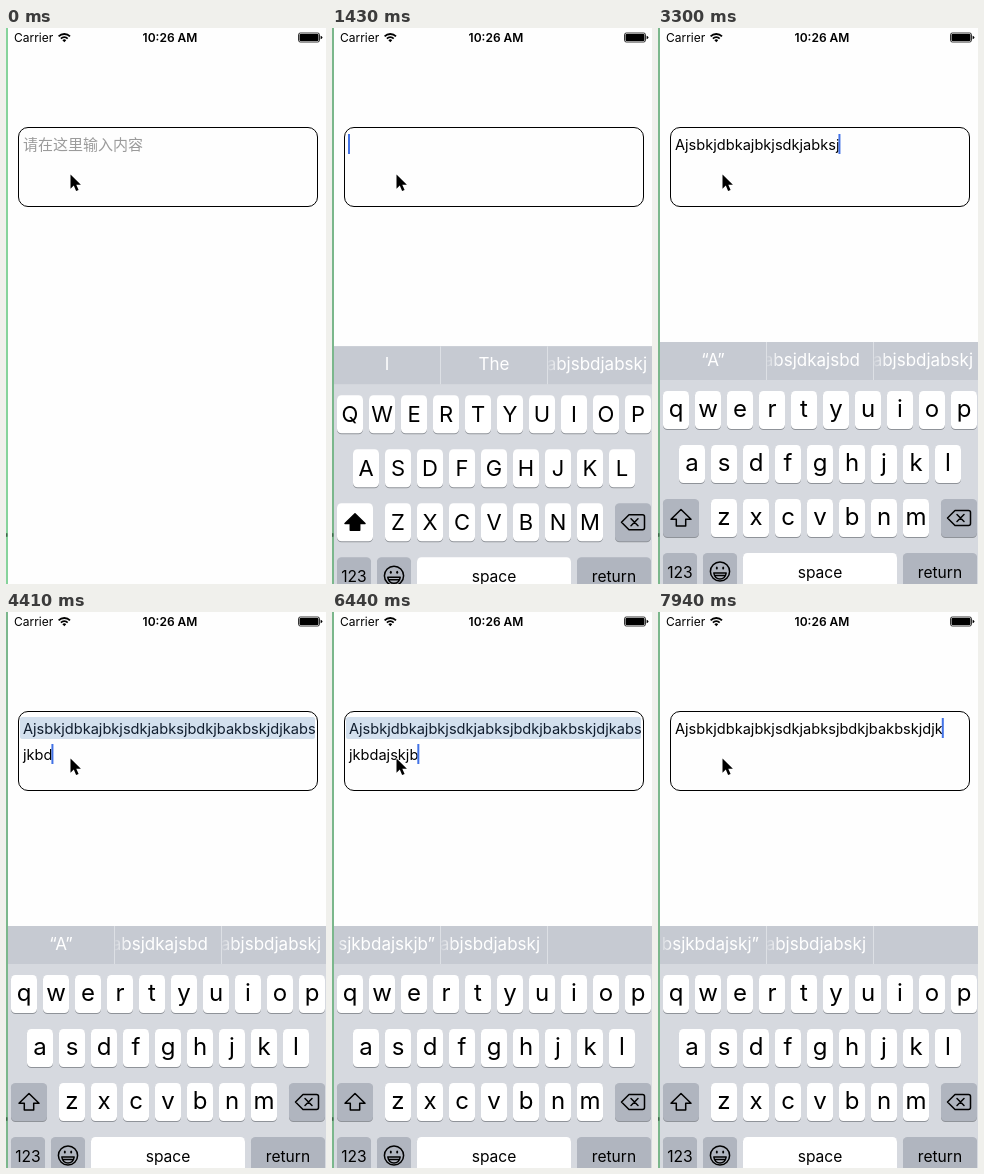
Recreate the animation shown at these times as an HTML page. Size 320 by 556 pixels, loop 8 s.

```html
<!DOCTYPE html>
<html lang="en">
<head>
<meta charset="utf-8">
<title>Text view with placeholder</title>
<style>
  html, body { margin: 0; width: 100%; height: 100%; overflow: hidden; background: #fefefe; }
  svg { display: block; }
  text { font-family: Inter, Roboto, sans-serif; white-space: pre; }
  .line { font-size: 14.6px; }
  .hint { font: 15px "Noto Sans CJK SC", "Noto Sans CJK", sans-serif; fill: #9b9b9b; }
  .tip { font-size: 17px; fill: #fff; }
  .mid { text-anchor: middle; }
  .lower { font-size: 24px; }
  .upper { font-size: 22px; }
  .word { font-size: 15.6px; }
  .ink { fill: none; stroke: #000; stroke-width: 1.5; stroke-linejoin: round; stroke-linecap: round; }
</style>
</head>
<body>
<svg id="stage" width="320" height="556" viewBox="0 0 320 556">
  <defs>
    <linearGradient id="fadeWhite" gradientUnits="userSpaceOnUse" x1="-2" x2="13">
      <stop stop-color="#fff" stop-opacity="0"/><stop offset="1" stop-color="#fff"/>
    </linearGradient>
    <linearGradient id="fadeBlue" gradientUnits="userSpaceOnUse" x1="-2" x2="13">
      <stop stop-color="#0a7be0" stop-opacity="0"/><stop offset="1" stop-color="#0a7be0"/>
    </linearGradient>
  </defs>
  <rect width="320" height="556" fill="#fefefe"/>

  <!-- status bar -->
  <text x="8" y="14" font-size="12">Carrier</text>
  <text x="164" y="14" font-size="12" font-weight="600" class="mid">10:26 AM</text>
  <g fill="none" stroke="#000" stroke-width="1.8">
    <path d="M52.6 8.3a8.2 8.2 0 0 1 11.4 0M54.9 10.6a5 5 0 0 1 6.8 0"/>
    <path d="M58.3 14.2l-1.9-2a2.8 2.8 0 0 1 3.8 0z" fill="#000" stroke="none"/>
  </g>
  <rect x="292.5" y="5" width="21" height="9" rx="1.8" fill="none" stroke="#000" stroke-width=".8"/>
  <rect x="293.5" y="6" width="19" height="7" rx=".8"/>
  <path d="M314.6 7.7q1.8.5 1.8 1.8t-1.8 1.8z"/>

  <!-- text view -->
  <rect id="marked" x="14" y="105" width="295" height="22" rx="2" fill="#d3e0ee"/>
  <rect x="12.5" y="99.5" width="299" height="79" rx="9.5" fill="none" stroke="#000"/>
  <text id="hint" class="hint" x="17" y="122">请在这里输入内容</text>
  <text id="line0" class="line" x="17" y="122"></text>
  <text id="line1" class="line" x="17" y="147.5"></text>
  <rect id="caret" width="2" height="20" fill="#4272e6"/>

  <g id="board">
    <rect y="314" width="320" height="250" fill="#d6d9df"/>
    <rect y="314" width="320" height="38" fill="#c6cad2"/>
    <path d="M108.5 314v38M215.5 314v38" stroke="#dde0e5"/>
    <g id="tips"></g>
    <g id="keys"></g>
    <path id="shift" class="ink" d="M23 481.5l10 9.7h-5.3v6.8h-9.4v-6.8H13z"/>
    <path class="ink" d="M297 482.5h13.5q2 0 2 2v11q0 2-2 2H297l-7.5-7.5zM299 486.5l7 7M306 486.5l-7 7"/>
    <g class="ink" stroke-width="1.3">
      <circle cx="62" cy="543.5" r="9.6"/>
      <path d="M55.8 545h12.4q-1 6-6.2 6t-6.2-6zM57 547.6h10"/>
      <ellipse cx="58.8" cy="540" rx="1" ry="1.5" fill="#000" stroke="none"/>
      <ellipse cx="65.2" cy="540" rx="1" ry="1.5" fill="#000" stroke="none"/>
    </g>
  </g>

  <rect id="edge" width="2" height="556"/>
  <rect y="505" width="1.5" height="4" rx=".7" fill="#3d6a4a"/>
  <path d="M64.5 146.5v14.2l3.3-3.1 2.3 5.4 2.5-1.1-2.3-5.2h4.6z" fill="#000" stroke="#fff" stroke-width="1" paint-order="stroke"/>
</svg>
<script>
const LOOP = 8000;
const WRAP = 40;
const TEXT = "Ajsbkjdbkajbkjsdkjabksjbdkjbakbskjdjkabsjkbdajskjb";
const $ = id => document.getElementById(id);
const clamp = v => Math.max(0, Math.min(1, v));
const show = (node, on) => node.setAttribute("opacity", +on);

function add(parent, tag, attrs, text = "") {
  const node = document.createElementNS("http://www.w3.org/2000/svg", tag);
  for (const name in attrs) node.setAttribute(name, attrs[name]);
  node.textContent = text;
  parent.append(node);
  return node;
}

// keys
const keys = $("keys"), letters = [];
function key(x, y, w, fill = "#fff") {
  add(keys, "rect", { x, y: y + 1, width: w, height: 38, rx: 4.5, fill: "#8f9399" });
  return add(keys, "rect", { x, y, width: w, height: 38, rx: 4.5, fill });
}
const GREY = "#b0b5bf";
["qwertyuiop", "asdfghjkl", "zxcvbnm"].forEach((row, r) => {
  const y = 363 + 54 * r;
  [...row].forEach((char, i) => {
    const x = [5, 21, 53][r] + 32 * i;
    key(x, y, 26);
    letters.push({ char, y, node: add(keys, "text", { x: x + 13, class: "mid" }) });
  });
});
const shiftKey = key(5, 471, 36, GREY);
key(283, 471, 36, GREY);
key(45, 525, 34, GREY);
for (const [x, w, label, fill] of [[5, 34, "123", GREY], [85, 154, "space", "#fff"], [245, 74, "return", GREY]]) {
  key(x, 525, w, fill);
  add(keys, "text", { x: x + w / 2, y: 549.5, class: "mid word" }, label);
}

let upperNow = null;
function setCase(upper) {
  if (upper === upperNow) return;
  upperNow = upper;
  for (const { char, y, node } of letters) {
    node.textContent = upper ? char.toUpperCase() : char;
    node.setAttribute("class", "mid " + (upper ? "upper" : "lower"));
    node.setAttribute("y", y + (upper ? 27 : 25.5));
  }
  shiftKey.setAttribute("fill", upper ? "#fff" : GREY);
  $("shift").style.fill = upper ? "#000" : "none";
}

// suggestions: cell, text, anchor, x inside the cell, start, end, picked
const tips = [
  [0, "I", "middle", 53, -999, 2130],
  [0, "“A", "middle", 52, 2130, 2500],
  [0, "“A”", "middle", 53, 2500, 4470],
  [0, "djkabsjkbd”", "end", 93, 4470, 5800],
  [0, "kabsjkbdaj”", "end", 97, 5800, 6200],
  [0, "sjkbdajskjb”", "end", 101, 6200, 6700],
  [0, "bsjkbdajskj”", "end", 99, 6700, 9999],
  [1, "The", "middle", 53, -999, 2130],
  [1, "Askjkjabjsba", "start", 13, 2130, 2500],
  [1, "absjdkajsbd", "end", 93, 2500, 4470],
  [1, "abjsbdjabskj", "end", 98, 4470, 6200, true],
  [1, "abjsbdjabskj", "end", 99, 6200, 9999],
  [2, "abjsbdjabskj", "end", 99, -999, 4470],
].map(([cell, text, anchor, x, from, to, picked]) => {
  const node = add($("tips"), "svg", { x: 2 + 107 * cell, y: 314, width: 106, height: 38 });
  if (picked) {
    node.setAttribute("overflow", "visible");
    add(node, "rect", { x: -1, width: 108, height: 38, fill: "#e8ebef" });
  }
  const label = add(node, "text", { x, y: 23.5, class: "tip", "text-anchor": anchor }, text);
  if (anchor === "end") label.style.fill = `url(#${picked ? "fadeBlue" : "fadeWhite"})`;
  return { node, from, to };
});

// number of typed characters at points in time
const typed = [[2130, 1], [2310, 3], [2840, 15], [2960, 16], [3710, 33], [3770, 34], [4240, 43],
  [4410, 44], [5589, 44], [5590, 46], [6040, 50], [6619, 50], [6620, 49], [6779, 49],
  [6780, 48], [7530, 41], [7650, 40], [7940, 37]];
function count(t) {
  if (t < typed[0][0]) return 0;
  const i = typed.findIndex(p => p[0] > t);
  if (i < 0) return typed.at(-1)[1];
  const [t0, n0] = typed[i - 1], [t1, n1] = typed[i];
  const n = n0 + (n1 - n0) * (t - t0) / (t1 - t0);
  return n1 < n0 ? Math.ceil(n - 1e-6) : Math.floor(n + 1e-6);
}

function slide(t) {
  if (t < 1310) return 250;
  const s = 0.035 * (t - 1260);
  return 242 * (1 + s) * Math.exp(-s);
}

function draw(t) {
  const editing = t >= 1310;
  const n = count(t);
  const row = n > WRAP ? 1 : 0;
  const lines = [$("line0"), $("line1")];
  lines[0].textContent = TEXT.slice(0, Math.min(n, WRAP));
  lines[1].textContent = TEXT.slice(WRAP, Math.max(n, WRAP));
  const width = lines[row].textContent ? lines[row].getComputedTextLength() : 0;
  $("caret").setAttribute("x", 16 + width);
  $("caret").setAttribute("y", row ? 132 : 106);
  const blink = clamp((t - 4950) / 110) - clamp((t - 5200) / 100);
  show($("caret"), editing ? 1 - blink : 0);
  show($("hint"), !editing);

  const marked = t >= 4410 && t < 6620;
  show($("marked"), marked);
  lines[0].style.fill = marked ? "#101d2e" : "#000";

  $("board").setAttribute("transform", `translate(0 ${slide(t)})`);
  setCase(t < 2130);
  for (const { node, from, to } of tips) {
    show(node, clamp((t - from) / 120) * (1 - clamp((t - to) / 120)));
  }
  $("edge").setAttribute("fill", t < 810 ? "#86d39b" : t < 890 ? "#80c493" : "#7bb78c");
}

function tick() {
  draw(performance.now() % LOOP);
  requestAnimationFrame(tick);
}
tick();
</script>
</body>
</html>
```
